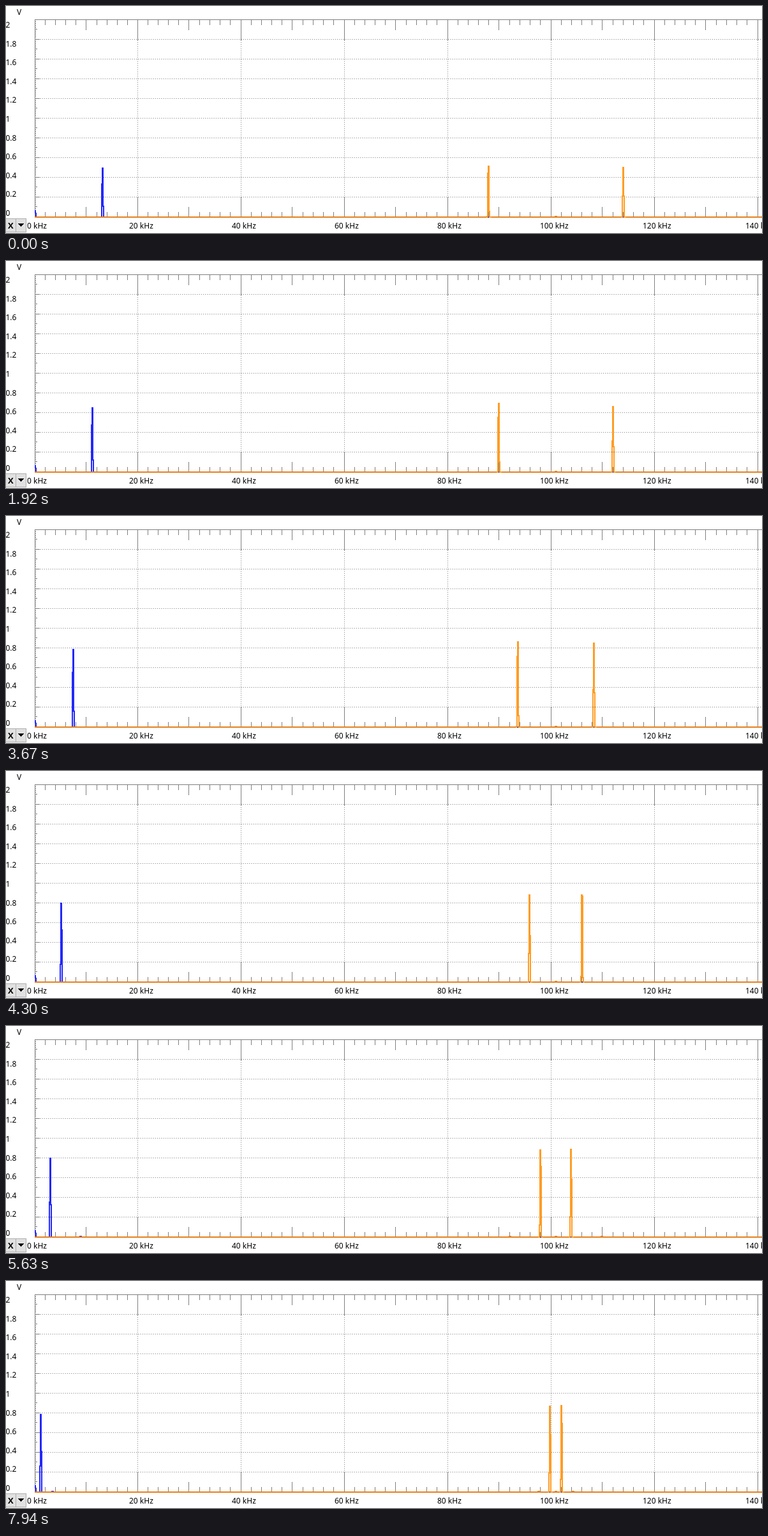
An HTML page with a canvas that plays this animation: 1185 by 357 pixels, repeating every 8 s.

```html
<!DOCTYPE html>
<html lang="en">
<head>
<meta charset="utf-8">
<title>Spectrum sweep</title>
<style>
  html, body { margin: 0; width: 100%; height: 100%; overflow: hidden; background: #fff; }
  canvas, svg { position: absolute; left: 0; top: 0; }
  text { font: 12px "Noto Sans", "Open Sans", sans-serif; fill: #000; }
  .key { font-weight: 700; font-size: 13px; }
</style>
</head>
<body>
<canvas id="grid" width="1185" height="357"></canvas>
<canvas id="trace" width="1185" height="357"></canvas>
<svg id="labels" width="1185" height="357" viewBox="0 0 1185 357">
  <text x="17" y="14">V</text>
</svg>
<script>
const W = 1185, H = 357, LEFT = 45, TOP = 21, BASE = 331;
const MAJOR_X = 161.86, MAJOR_Y = 31.05;
const BLUE = '#2228fa', ORANGE = '#ff9c24', ORANGE_BASE = '#e6811e';
const CARRIER = 861.8, ZERO = 45.55;
const LOOP = 8000, FIRST = 174, STEP = 69.85;

// the hand-turned tuning: time in ms, distance from the carrier in px
const TUNING = [
  [0, 105.7], [940, 104.8], [1300, 100.5], [1780, 93], [2610, 74], [3670, 59.75],
  [4300, 41.2], [5200, 32.5], [5630, 23.9], [6820, 14], [7660, 9.05]
];

const labels = document.getElementById('labels');
function label(x, y, str, cls) {
  const el = document.createElementNS('http://www.w3.org/2000/svg', 'text');
  el.setAttribute('x', x);
  el.setAttribute('y', y);
  if (cls) el.setAttribute('class', cls);
  el.textContent = str;
  labels.appendChild(el);
}

function drawGrid() {
  const g = document.getElementById('grid').getContext('2d');
  const box = (x, y, w, h) => g.fillRect(x, y, w, h);
  const rank = j => j === 0 ? 4 : j === 5 ? 2 : 1;
  const place = (origin, major, i, j) =>
    Math.floor(origin + i * major) + Math.floor(j * major / 10);

  g.fillStyle = '#808080';
  box(LEFT, TOP, W - LEFT, 1);
  box(LEFT, TOP, 1, 311);
  for (let i = 0; i <= 7; i++) {
    for (let j = 0; j < 10; j++) {
      const x = place(LEFT, MAJOR_X, i, j), len = 8 * rank(j);
      box(x, TOP, 1, len + 1);
      box(x, 332 - len, 1, len);
      if (j === 0) for (let y = TOP; y < 332; y += 3) box(x, y, 1, 1);
    }
  }
  for (let i = 0; i < 10; i++) {
    for (let j = 0; j < 10; j++) {
      const y = place(TOP, MAJOR_Y, i, j);
      box(LEFT, y, 2 * rank(j), 1);
      if (j === 0) for (let x = LEFT; x < W; x += 3) box(x, y, 1, 1);
    }
  }

  // axis selector button
  g.fillStyle = '#adadad';
  box(0, 334, 32, 22);
  g.fillStyle = '#e1e1e1';
  box(0, 335, 31, 20);
  g.fillStyle = '#adadad';
  box(15, 335, 1, 20);
  g.fillStyle = '#000';
  for (let i = 0; i < 5; i++) box(19 + i, 342 + i, 9 - 2 * i, 1);

  label(3, 350, 'X', 'key');
  for (let i = 0; i <= 10; i++) label(-0.5, 34 + i * 29.6, String((20 - 2 * i) / 10));
  label(33, 350, '0 kHz');
  for (let i = 1; i <= 7; i++) label(32 + i * 161, 350, i * 20 + ' kHz');
}

const c = document.getElementById('trace').getContext('2d');
const lobe = d => Math.abs(d) < 1.7 ? (1 - (d / 1.7) ** 2) ** 2 : 0;

// peak height: low-pass roll-off plus a slight loss close to zero
const gain = (max, half, cutoff, order) =>
  max / (1 + (half / cutoff) ** order) / (1 + (1.2 / half) ** 2);

// stepped outline of one spectral peak, one bin per pixel
function spike(x, height) {
  const bin = Math.floor(x), off = x - bin - 0.5;
  let prev = BASE;
  for (let k = -2; k <= 3; k++) {
    const y = Math.round(BASE - height * lobe(k - off) / lobe(off));
    const edge = bin + k;
    c.fillRect(edge - 1, Math.min(y, prev), 2, Math.abs(y - prev) + 2);
    c.fillRect(edge - 1, y, 3, 2);
    prev = y;
  }
}

function floorLine(peaks, color) {
  let x = LEFT;
  c.fillStyle = color;
  for (const p of peaks) {
    const bin = Math.floor(p);
    c.fillRect(x, BASE, bin - 2 - x, 2);
    x = bin + 3;
  }
  c.fillRect(x, BASE, W - x, 2);
}

const bump = x => c.fillRect(Math.round(x) - 2, BASE - 1, 4, 1);

function tuning(t) {
  const i = TUNING.findIndex(k => k[0] > t);
  if (i < 0) return TUNING[TUNING.length - 1][1];
  const [t0, a] = TUNING[i - 1], [t1, b] = TUNING[i];
  return a + (b - a) * (t - t0) / (t1 - t0);
}

function draw(t) {
  const n = Math.floor((t - FIRST) / STEP);
  const half = tuning(n < 0 ? 0 : FIRST + 6 + n * STEP);
  const low = CARRIER - half, high = CARRIER + half;
  const harmonic = half < 33;

  c.clearRect(0, 0, W, H);
  floorLine([], BLUE);
  c.fillRect(LEFT, 321, 2, 5);
  c.fillRect(LEFT + 1, 325, 2, 7);
  spike(ZERO + half, gain(124, half, 114.8, 6));
  if (harmonic) bump(ZERO + 3 * half);

  floorLine([low, high], ORANGE_BASE);
  bump(CARRIER);
  if (harmonic) {
    bump(CARRIER - 3 * half);
    bump(CARRIER + 3 * half);
  }
  c.fillStyle = ORANGE;
  spike(low, gain(137, half, 112, 6));
  spike(high, gain(138, half, 111.4, 5));
}

drawGrid();
const start = performance.now();
function tick() {
  draw((performance.now() - start) % LOOP);
  requestAnimationFrame(tick);
}
tick();
</script>
</body>
</html>
```
